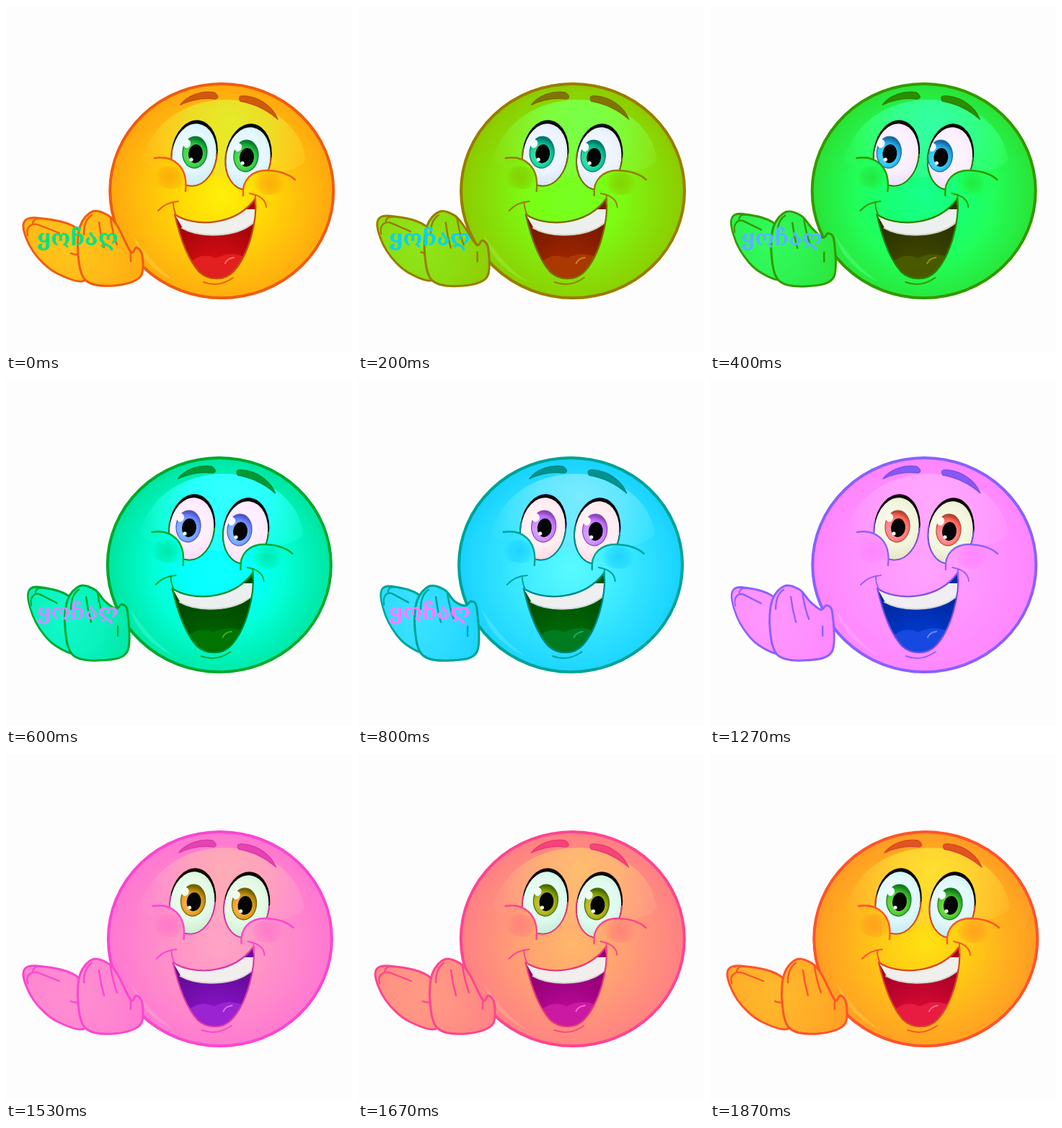
An HTML page with a canvas that plays this animation: 480 px wide and 480 px high, repeating every 1940 ms.

```html
<!DOCTYPE html>
<html lang="ka">
<head>
<meta charset="utf-8">
<style>
html, body { margin: 0; width: 100%; height: 100%; overflow: hidden; background: #fdfdfd; }
canvas { display: block; }
</style>
</head>
<body>
<canvas id="stage" width="480" height="480"></canvas>
<script>
const canvas = document.getElementById('stage');
const ctx = canvas.getContext('2d');
const LOOP = 1940, STEPS = 29, TEXT_STEPS = 14;
const LINE = '#f05c0f', DARK = '#c4500c';

// Key poses; clap is how far the hands are closed
const POSES = [
  { at: 0, clap: 0, sway: 0, gaze: 0 },
  { at: 6, clap: .7, sway: -2.6, gaze: -11 },
  { at: 12, clap: 1, sway: -4.3, gaze: 0 },
  { at: 15, clap: .03, sway: 0, gaze: 0 },
  { at: 19, clap: .8, sway: -2, gaze: 0 },
  { at: 23, clap: 0, sway: -2.4, gaze: 0 },
  { at: 28, clap: 0, sway: 0, gaze: 0 }
];

function poseAt(step) {
  const i = Math.max(1, POSES.findIndex(p => p.at >= step));
  const a = POSES[i - 1], b = POSES[i];
  const ease = (1 - Math.cos(Math.PI * (step - a.at) / (b.at - a.at))) / 2;
  const mix = key => a[key] + (b[key] - a[key]) * ease;
  return { clap: mix('clap'), sway: mix('sway'), gaze: mix('gaze') };
}

function paint(path, fill, stroke, width) {
  if (fill) { ctx.fillStyle = fill; ctx.fill(path); }
  if (stroke) { ctx.strokeStyle = stroke; ctx.lineWidth = width; ctx.stroke(path); }
}

function shape(d, fill, stroke, width) {
  paint(new Path2D(d), fill, stroke, width);
}

function line(d, width = 2.4, color = LINE) {
  shape(d, null, color, width);
}

function oval(x, y, rx, ry, tilt, fill, stroke, width) {
  const path = new Path2D();
  path.ellipse(x, y, rx, ry, tilt, 0, Math.PI * 2);
  paint(path, fill, stroke, width);
}

// Smooth closed curve through the points
function loop(points) {
  const n = points.length, path = new Path2D();
  const p = i => points[(i + n) % n];
  path.moveTo(...p(0));
  for (let i = 0; i < n; i++) {
    const [a, b, c, d] = [p(i - 1), p(i), p(i + 1), p(i + 2)];
    path.bezierCurveTo(
      b[0] + (c[0] - a[0]) / 6, b[1] + (c[1] - a[1]) / 6,
      c[0] - (d[0] - b[0]) / 6, c[1] - (d[1] - b[1]) / 6, c[0], c[1]);
  }
  return path;
}

function radial(x, y, r, ...stops) {
  const g = ctx.createRadialGradient(x, y, 0, x, y, r);
  stops.forEach(([at, color]) => g.addColorStop(at, color));
  return g;
}

function eye(x, y, gaze) {
  const iris = gaze, tilt = .14;
  oval(x + .5, y - 1, 32, 46, tilt, '#080808');
  const ball = new Path2D();
  ball.ellipse(x, y + 1.5, 30.5, 43.5, tilt, 0, Math.PI * 2);
  paint(ball, radial(x - 4, y - 5, 50, [0, '#f2fcff'], [.6, '#e2f7ff'], [1, '#c6eaf6']));
  const rim = new Path2D();
  rim.ellipse(x, y + 1, 31.5, 44, tilt, -.1, Math.PI + .1);
  paint(rim, null, DARK, 2);

  ctx.save();
  ctx.clip(ball);
  ctx.translate(iris, 4 - y * 0);
  ctx.translate(x, y - 6);
  oval(0, 0, 17, 22, .1, radial(-3, 5, 25, [0, '#7cec61'], [.55, '#3fd24b'], [.8, '#18ad39'], [1, '#087b2d']), '#087b2d', 1.2);
  oval(1, 2, 10, 13, .1, '#050505');
  oval(-11, -12, 5, 6, .4, '#eefcff');
  oval(-5, 10, 2.6, 2.6, 0, '#eefcff');
  ctx.restore();
}

function mouth() {
  const lips = new Path2D('M234 289 C260 307 318 306 346 267 C349 300 336 346 316 368 C303 382 281 381 268 369 C251 350 241 320 234 289 Z');
  ctx.save();
  ctx.clip(lips);
  paint(lips, radial(295, 385, 85, [0, '#de171a'], [.5, '#cb0c12'], [1, '#a8050a']));
  shape('M252 358 Q271 340 291 350 Q314 338 337 351 L310 385 H268 Z', '#e2201f');
  line('M304 357 Q307 350 316 349', 2, '#ff6f6a');
  shape('M230 282 H350 L343 301 C318 322 268 322 245 308 Z', '#efefec');
  line('M244 308 C268 322 318 322 343 301', 2, '#d8d2cf');
  ctx.restore();
  paint(lips, null, DARK, 2.2);
}

function face(gaze) {
  const skin = radial(300, 262, 168, [0, '#fff008'], [.35, '#ffda05'], [.65, '#ffbe0c'], [.88, '#ffab0e'], [1, '#ff9b10']);
  oval(299.3, 256.5, 155, 148.5, 0, skin);
  shape('M188 212 C205 158 252 130 308 130 C362 131 411 166 416 214 C400 245 205 245 188 212 Z',
    radial(312, 160, 125, [0, 'rgba(226,240,45,.9)'], [.45, 'rgba(232,232,45,.75)'], [.8, 'rgba(250,215,40,.5)'], [1, 'rgba(255,205,40,.2)']));
  shape('M176 318 C184 347 207 370 237 383 Q206 363 176 318 Z', 'rgba(255,214,70,.45)');
  oval(299.3, 256.5, 155, 148.5, 0, null, LINE, 4);

  shape('M242 137 C252 124 272 117 289 120 Q298 127 290 129 Q266 126 242 137 Z', '#cf5a0c', DARK, 1.5);
  shape('M325 132 Q320 123 333 125 C352 127 370 140 377 157 Q354 137 325 132 Z', '#cf5a0c', DARK, 1.5);

  eye(261, 205, gaze + 1);
  eye(336, 210, gaze - 3);

  const leftCheek = 'M206 211 C232 207 253 222 249 257';
  const rightCheek = 'M329 263 C327 240 342 228 362 228 Q388 229 401 241';
  shape(leftCheek + ' Q213 264 206 211 Z', skin);
  shape(rightCheek + ' C385 267 350 270 329 263 Z', skin);
  for (const [x, y] of [[228, 238], [365, 246]]) {
    oval(x, y, 23, 16, .1, radial(x, y, 23, [0, 'rgba(246,148,10,.6)'], [.6, 'rgba(248,158,10,.4)'], [1, 'rgba(255,170,10,0)']));
  }
  line(leftCheek);
  line(rightCheek);

  mouth();
  line('M211 284 Q222 272 239 271', 2);
  line('M232 273 Q232 281 236 290', 2);
  line('M338 260 Q360 264 361 279', 2);
  line('M346 262 V275', 2);
  line('M274 383 Q295 391 315 377', 2);
}

function hand(points, creases) {
  const skin = radial(90, 332, 100, [0, '#ffc51c'], [.6, '#ffba16'], [1, '#ffad12']);
  paint(loop(points), skin, LINE, 3);
  line(creases);
}

function hands(clap) {
  // The far hand narrows and rises as it closes
  ctx.save();
  ctx.translate(13 * clap, -24.5 * clap);
  ctx.scale(1 - .23 * clap, 1 + .057 * clap);
  hand([[24, 304], [43, 294], [102, 312], [112, 378], [71, 371], [38, 341]],
    'M30 318 C27 306 36 300 46 304 L74 315 M37 301 Q39 294 48 295 M90 343 Q97 346 104 344');
  ctx.restore();

  // The near hand slides in while its thumb lifts
  ctx.save();
  ctx.translate(-21 * clap, clap);
  const thumb = [[173, 341], [181, 335], [189, 346]].map(([x, y]) => [x - 3 * clap, y - 29 * clap]);
  hand([[100, 345], [103, 305], [120, 285], [141, 290], [155, 306], ...thumb, [186, 376], [150, 388], [111, 381]],
    'M129 300 Q131 318 136 335 M145 295 Q148 315 154 331 M108 317 Q108 297 119 290 M173 341 V354');
  ctx.restore();
}

function draw(step) {
  const { clap, sway, gaze } = poseAt(step);
  ctx.fillStyle = '#fdfdfd';
  ctx.fillRect(0, 0, 480, 480);
  ctx.lineCap = ctx.lineJoin = 'round';

  ctx.save();
  ctx.translate(sway, 0);
  face(gaze);
  ctx.restore();
  hands(clap);

  if (step < TEXT_STEPS) {
    ctx.font = 'bold 31px "DejaVu Serif", "DejaVu Sans", serif';
    ctx.textAlign = 'center';
    ctx.fillStyle = '#00e183';
    ctx.fillText('ყოჩაღ', 99.5, 332);
  }
  canvas.style.filter = `hue-rotate(${step * 360 / STEPS}deg)`;
}

let shown = -1;
const start = performance.now();

function tick() {
  // 15 steps per second on a 10 ms clock
  const t = Math.floor((performance.now() - start) % LOOP / 10) * 10;
  const step = Math.min(STEPS - 1, Math.floor((t + 5) * .015));
  if (step !== shown) draw(shown = step);
  requestAnimationFrame(tick);
}
tick();
</script>
</body>
</html>
```
